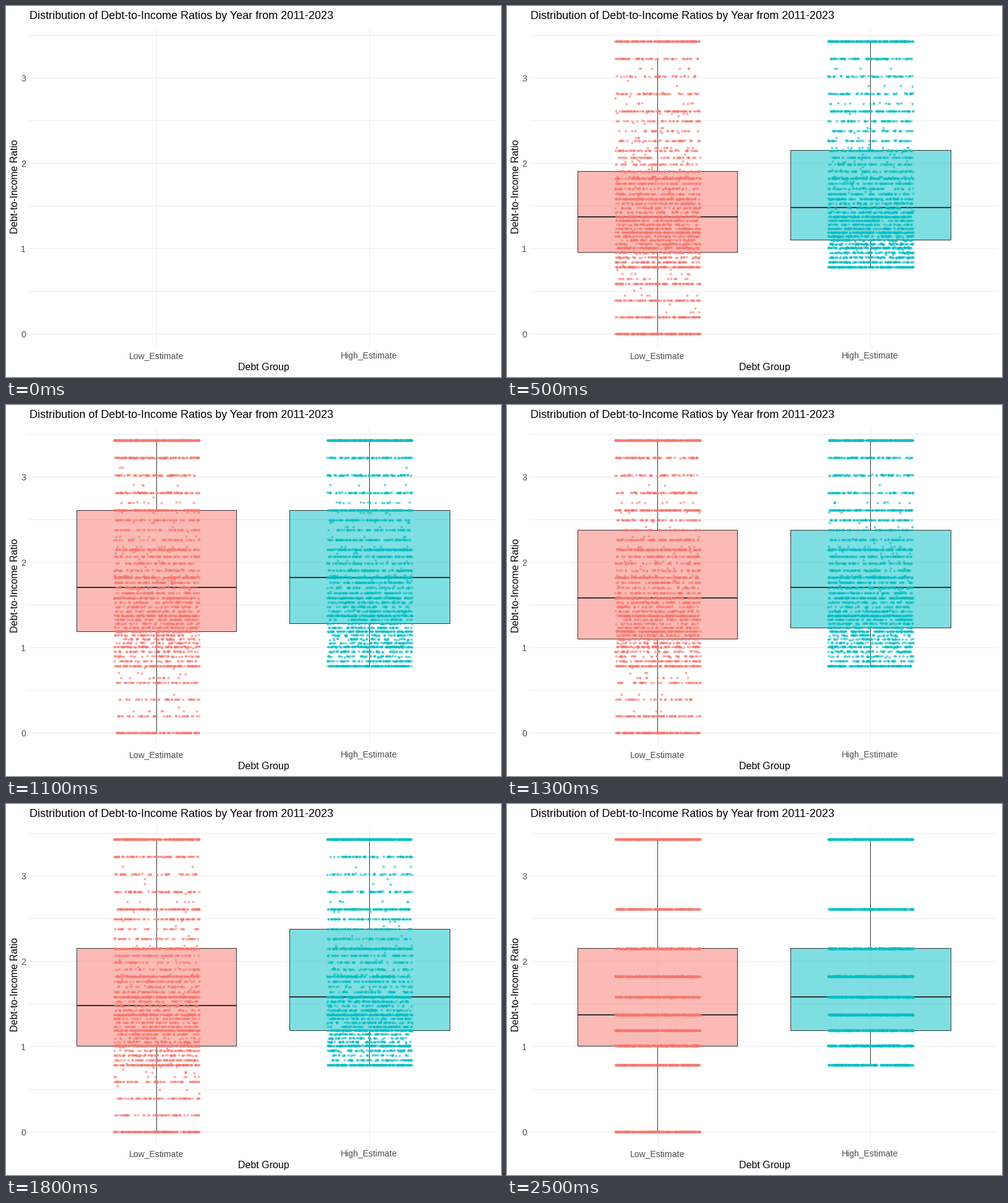
Recreate the animation shown at these times as a matplotlib script. Size 800 by 600 pixels, loop 2.6 s.

```python
import numpy as np
import matplotlib.pyplot as plt
from matplotlib.animation import FuncAnimation
from matplotlib.patches import Rectangle

W, H, DPI = 800, 600, 100
PX = 72 / DPI                      # one pixel in points
FRAMES, FIRST = 26, 2              # the plot is empty before FIRST
COUNTIES = 3100

# Heights in pixels of the ten debt-ratio bins, lowest ratio first
BINS = np.array([530, 422, 390.75, 366.2, 340.7,
                 312.2, 278.7, 233.7, 170, 57])
STEPS = [2, 3, 7, 11, 15, 21, 25]

plt.rcParams["font.family"] = "Liberation Sans"
fig = plt.figure(figsize=(W / DPI, H / DPI), dpi=DPI, facecolor="white")
ax = fig.add_axes([0, 0, 1, 1])
ax.set_xlim(0, W)
ax.set_ylim(H, 0)
ax.axis("off")


def line(xs, ys, color, width=1, z=1):
    return ax.plot(xs, ys, color=color, lw=width * PX, zorder=z,
                   solid_capstyle="butt", snap=False)[0]


def label(x, y, text, size, color="black", ha="center", **kw):
    ax.text(x, y, text, fontsize=size * PX, color=color, ha=ha,
            va="baseline", **kw)


def pixel_row(y):
    """Centre of the pixel row for a thin line at y."""
    return np.floor(y + 0.25) + 0.5


class Group:
    """One box plot with its jittered points."""

    def __init__(self, x, left, right, color, low, quartiles):
        self.x, self.left, self.right, self.low = x, left, right, low
        self.quartiles = np.array(quartiles).T
        self.fill = Rectangle((left, 0), right - left, 0, fc=color,
                              alpha=0.5, lw=0, zorder=2, snap=False)
        self.edge = Rectangle((left, 0), right - left, 0, fc="none",
                              ec="#333333", lw=PX, zorder=3, snap=False)
        for box in (self.fill, self.edge):
            ax.add_patch(box)
        self.whiskers = [line([], [], "#333333", z=3) for _ in range(2)]
        self.median = line([], [], "#333333", 2, z=3)
        self.dots = ax.plot([], [], "o", color=color, alpha=0.5, ms=3 * PX,
                            mew=PX, zorder=4)[0]
        self.artists = [self.fill, self.edge, *self.whiskers,
                        self.median, self.dots]

    def sample(self, rng, q, quarters, spread):
        """Yearly mean of each county's quarterly bin."""
        level = np.interp(rng.random(COUNTIES), [0, 0.25, 0.5, 0.75, 1],
                          [self.low - 0.4, *q, 9.8])
        noise = spread * rng.standard_t(3, (quarters, COUNTIES))
        k = np.clip(np.rint(level + noise), self.low, 9).astype(int)
        return BINS[k].mean(axis=0) + rng.uniform(-0.35, 0.35, COUNTIES)

    def update(self, i, rng):
        for artist in self.artists:
            artist.set_visible(i >= FIRST)
        if i < FIRST:
            return
        q = [np.rint(4 * np.interp(i, STEPS, row)) / 4
             for row in self.quartiles]
        quarters = 1 if i == FRAMES - 1 else 4
        y = self.sample(rng, q, quarters, 0.3 - 0.005 * i)
        x = self.x + rng.uniform(-68.8, 68.8, COUNTIES)
        self.dots.set_data(x, y)

        q1, mid, q3 = np.interp(q, np.arange(10), BINS)
        reach = 1.5 * (q1 - q3)
        top = y[y >= q3 - reach].min()
        bottom = y[y <= q1 + reach].max()
        q1, q3, mid = pixel_row(q1), pixel_row(q3), np.rint(mid)
        for box in (self.fill, self.edge):
            box.set_y(q3)
            box.set_height(q1 - q3)
        self.whiskers[0].set_data([self.x] * 2, [top, q3])
        self.whiskers[1].set_data([self.x] * 2, [q1, bottom])
        self.median.set_data([self.left, self.right], [mid, mid])


GRID, GREY = "#EBEBEB", "#4D4D4D"
for n in range(8):
    y = 530.5 - 69 * n
    line([37, 794], [y, y], GRID)
    if n % 2 == 0:
        label(32, y + 5.5, str(n // 2), 14, GREY, "right")
for x, name in ((243.5, "Low_Estimate"), (587.5, "High_Estimate")):
    line([x, x], [34, 553], GRID)
    label(x - 0.5, 570.4, name, 14, GREY)

label(37.5, 21, "Distribution of Debt-to-Income Ratios by Year from 2011-2023",
      18, ha="left")
label(416.3, 589, "Debt Group", 16)
label(19, 291.5, "Debt-to-Income Ratio", 16, rotation=90,
      rotation_mode="anchor")

# Quartiles in bin units at each of STEPS
groups = [
    Group(243.5, 114.5, 372.5, "#F8766D", 0,
          [(1, 2.5, 5), (1, 2.75, 5.25), (2.5, 5, 7.25), (3, 5.5, 8),
           (2, 4.5, 7), (2.25, 4.75, 7), (2, 4, 7)]),
    Group(587.5, 458.5, 717.5, "#00BFC4", 1,
          [(2, 3.5, 5.75), (2, 3.5, 6), (3.25, 5.5, 7.75), (3.5, 6, 8),
           (3, 5, 7.25), (3, 5.25, 7.5), (3, 5, 7)]),
]


def draw(i):
    rng = np.random.default_rng(1999 + i)
    for group in groups:
        group.update(i, rng)
    return [a for g in groups for a in g.artists]


anim = FuncAnimation(fig, draw, frames=FRAMES, interval=100,
                     init_func=lambda: draw(0), repeat=True, repeat_delay=0)
plt.show()
```
